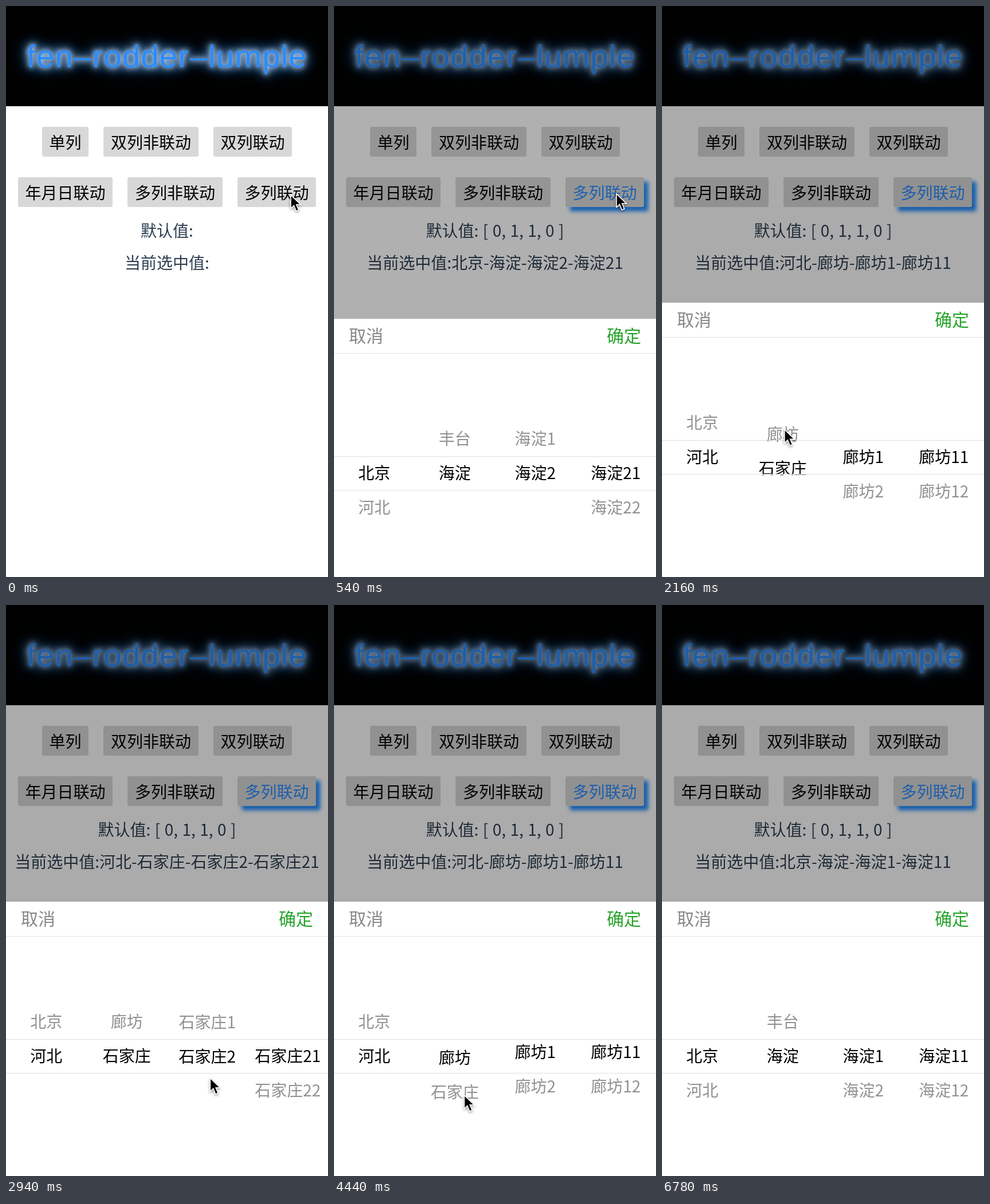
Write an HTML page that moves like this. It is 562x997 px and loops after 6.84 s.

```html
<!DOCTYPE html>
<html lang="zh-CN">
<head>
<meta charset="utf-8">
<title>Picker</title>
<style>
  html, body { margin: 0; width: 100%; height: 100%; overflow: hidden; background: #fff; }
  body { position: relative; color: #2c3e50; font: 28px "Noto Sans CJK SC", "Noto Sans CJK", "Noto Sans", sans-serif; }
  #stage { position: absolute; left: 0; top: 0; width: 562px; height: 997px; overflow: hidden; white-space: nowrap; }
  #stage div, #cursor { position: absolute; }
  .title {
    width: 562px; height: 175px; background: #000; color: #2a8cff; text-align: center;
    font: 56px/175px "Liberation Sans", Arial, sans-serif; letter-spacing: 1.35px;
    text-shadow: 0 0 8px #cfe2f8, 0 0 15px #a8ccf4, 0 0 22px #5aa0ee, 0 0 32px #228dff;
  }
  .row { width: 562px; display: flex; justify-content: center; gap: 26.5px; }
  #stage .btn { position: static; padding: 0 12.5px; line-height: 52px; border-radius: 3px; background: #d8d8d8; color: #000; }
  #stage .btn.on { color: #2a8cff; box-shadow: 7.5px 7.5px 7.5px #228dff; }
  .line { width: 562px; line-height: 56px; text-align: center; }
  #initial { top: 363px; word-spacing: 1.2px; }
  #current { top: 419px; }
  #dim { width: 562px; height: 997px; background: #000; }
  #panel { top: 518px; width: 562px; height: 479px; background: #fff; }
  .bar { width: 562px; height: 60px; border-bottom: 1px solid #e2e2e2; font-size: 30px; line-height: 57px; }
  .cancel { left: 26px; color: #888; }
  .ok { right: 26px; color: #26a22a; }
  .list { top: 238px; width: 562px; color: #919191; }
  .band { top: 240px; width: 562px; height: 58px; overflow: hidden; background: #fff; border: solid #dedede; border-width: 1px 0; }
  .band .list { top: -3px; color: #000; }
  .col { width: 140.5px; line-height: 60px; text-align: center; white-space: pre; }
  #cursor { left: 0; top: 0; overflow: visible; filter: drop-shadow(0 2px 2px rgba(0, 0, 0, .4)); }
</style>
</head>
<body>
<div id="stage">
  <div class="title">fen–rodder–lumple</div>
  <div class="row" style="top:211px">
    <div class="btn">单列</div><div class="btn">双列非联动</div><div class="btn">双列联动</div>
  </div>
  <div class="row" style="top:299px">
    <div class="btn">年月日联动</div><div class="btn">多列非联动</div><div class="btn" id="linked">多列联动</div>
  </div>
  <div class="line" id="initial"></div>
  <div class="line" id="current"></div>
  <div id="dim"></div>
  <div id="panel">
    <div class="bar"><div class="cancel">取消</div><div class="ok">确定</div></div>
    <div class="list"></div>
    <div class="band"><div class="list"></div></div>
  </div>
  <svg id="cursor" width="20" height="30">
    <path d="M0 0V23.5L5.4 18.4L9.4 28L13.8 26.2L9.8 16.8H17.2Z" stroke="#fff" stroke-width="1.6"/>
  </svg>
</div>
<script>
const LOOP = 6840, STEP = 60, ROW = 60, COL = 140.5;
const PRESS = 180, OPEN = 330, SLIDE = 300, HIDE = 6360;
const DRAG = 240, SETTLE = 200, REST = 120;
const INITIAL = [0, 1, 1, 0];

const provinces = ['北京', '河北'];
const cities = [['丰台', '海淀'], ['廊坊', '石家庄']];

// Each drag pulls one column by a number of rows, starting at height y.
const drags = [
  { at: 1080, col: 0, y: 838, pull: .9 },
  { at: 1980, col: 1, y: 780, pull: .9 },
  { at: 2580, col: 2, y: 880, pull: .9 },
  { at: 3180, col: 3, y: 826, pull: .9 },
  { at: 4080, col: 1, y: 772, pull: -1.4 },
  { at: 4860, col: 0, y: 763, pull: -1.4 },
  { at: 5880, col: 1, y: 832, pull: .9 }
];

// Places the pointer passes between drags: time, x, y.
const path = [[0, 497, 330], [540, 493, 328], [660, 493, 328], [1740, 150, 925], [3720, 345, 720], [5520, 110, 970]];
for (const { at, col, y, pull } of drags) {
  const x = (col + .5) * COL - 3;
  const end = [x + 10 * pull ** 2, y - ROW * pull];
  path.push([at, x, y], [at + DRAG, ...end], [at + DRAG + REST, ...end]);
}
path.sort((a, b) => a[0] - b[0]);

const $ = id => document.getElementById(id);
const clamp = p => Math.min(1, Math.max(0, p));
const mix = (a, b, p) => a + (b - a) * p;
const ease = p => 1 - (1 - p) ** 2.35;
const setText = (el, s) => { if (el.textContent !== s) el.textContent = s; };

// Each list holds four columns: a grey set behind and a black set in the band.
const layers = [...document.querySelectorAll('.list')].map(list =>
  INITIAL.map((_, k) => {
    const col = document.createElement('div');
    col.className = 'col';
    col.style.left = k * COL + 'px';
    return list.appendChild(col);
  }));

// Replays the drags up to t; a release picks a row and resets the columns after it.
function pickerAt(t) {
  const pick = [...INITIAL];
  let rows = [...pick];
  for (const { at, col, pull } of drags) {
    if (t < at) break;
    rows[col] += pull * clamp((t - at) / DRAG);
    if (t < at + DRAG) break;
    pick[col] += Math.sign(pull);
    pick.fill(0, col + 1);
    const p = ease(clamp((t - at - DRAG) / SETTLE));
    rows = rows.map((r, k) => mix(r, pick[k], p));
  }
  return { pick, rows };
}

function columns([a, b, c]) {
  const city = cities[a][b];
  const numbered = s => [s + 1, s + 2];
  return [provinces, cities[a], numbered(city), numbered(city + (c + 1))];
}

function pointerAt(t) {
  const next = path.findIndex(p => p[0] > t);
  if (next < 0) return path[path.length - 1].slice(1);
  const a = path[next - 1], b = path[next];
  const p = (t - a[0]) / (b[0] - a[0]);
  return [mix(a[1], b[1], p), mix(a[2], b[2], p)];
}

function draw(t) {
  const { pick, rows } = pickerAt(t);
  const cols = columns(pick);
  const pressed = t >= PRESS;
  $('linked').classList.toggle('on', pressed);
  setText($('initial'), '默认值:' + (pressed ? ` [ ${INITIAL.join(', ')} ]` : ''));
  setText($('current'), '当前选中值:' + (pressed ? cols.map((c, k) => c[pick[k]]).join('-') : ''));

  const shown = ease(clamp((t - OPEN) / SLIDE));
  $('dim').style.opacity = .33 * shown;
  $('panel').style.transform = `translateY(${479 * (1 - shown)}px)`;

  for (const layer of layers) {
    layer.forEach((col, k) => {
      setText(col, cols[k].join('\n'));
      col.style.transform = `translateY(${-rows[k] * ROW}px)`;
    });
  }

  const [x, y] = pointerAt(t);
  $('cursor').style.transform = `translate(${x}px, ${y}px)`;
  $('cursor').style.visibility = t < HIDE ? 'visible' : 'hidden';
}

const start = performance.now();
function tick() {
  const t = (performance.now() - start) % LOOP;
  draw(Math.floor(t / STEP) * STEP);
  requestAnimationFrame(tick);
}
tick();
</script>
</body>
</html>
```
